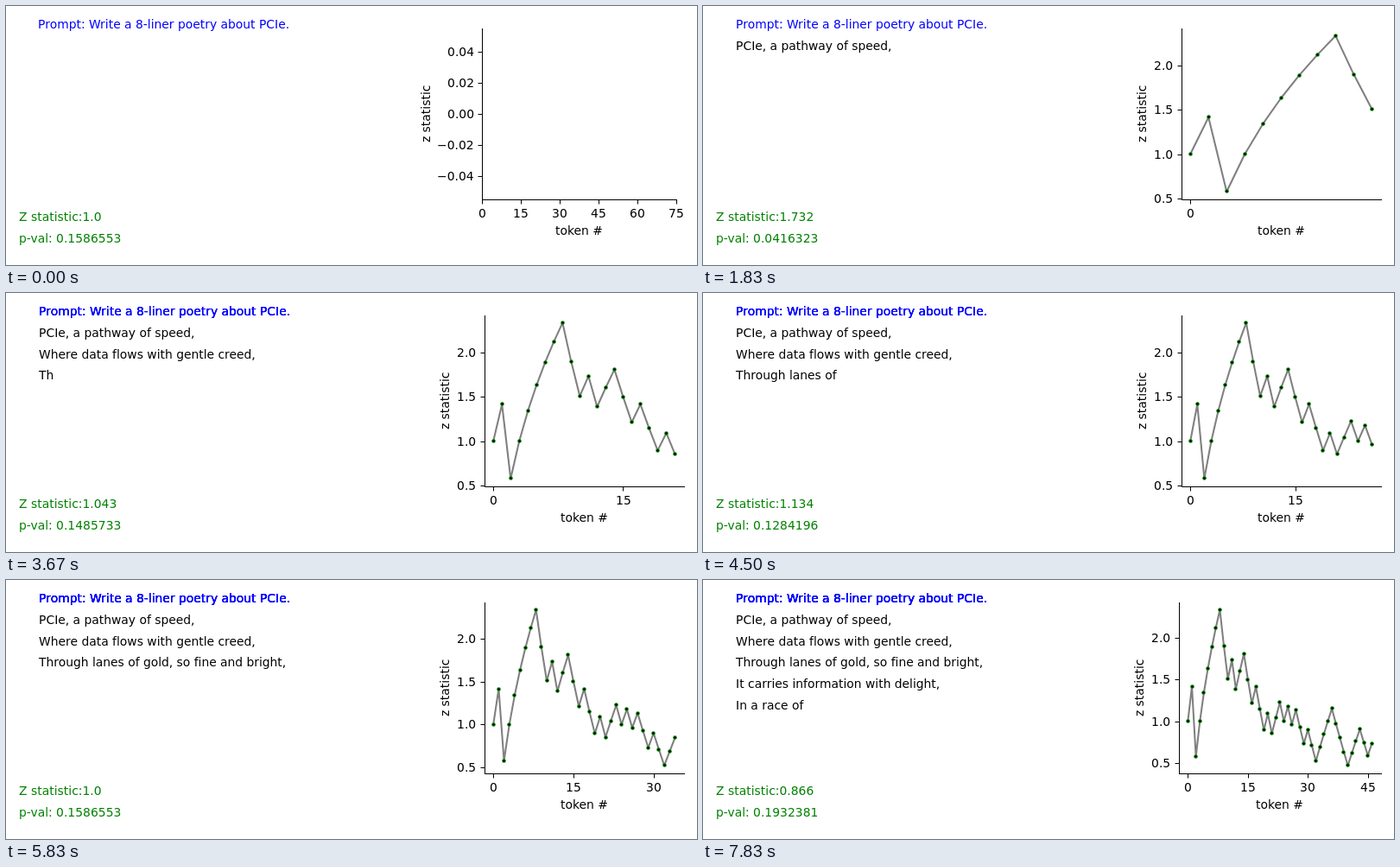
Write an HTML page with a canvas that moves like this. It is 800x300 px and loops after 8 s.

```html
<!DOCTYPE html>
<html lang="en">
<head>
<meta charset="utf-8">
<title>Token z statistic</title>
<style>
  html, body { margin: 0; width: 100%; height: 100%; overflow: hidden; background: #fff; }
  canvas { display: block; }
</style>
</head>
<body>
<canvas id="stage" width="800" height="300"></canvas>
<script>
const ctx = document.getElementById("stage").getContext("2d");

const LOOP = 8000, FPS = 6;
const PT = 100 / 72;
const PAD = 15, TOP = 25.56, BOTTOM = 223.95, HEIGHT = BOTTOM - TOP;
const TICK = 3.5 * PT, TICK_GAP = 2 * TICK, LABEL_GAP = 4 * PT;
// Size of the right-hand axes before the layout is tightened
const LOOSE_WIDTH = 188, LOOSE_BINS = 8, BINS = 7;

ctx.font = `${10 * PT}px "DejaVu Sans", sans-serif`;
ctx.textAlign = "left";

const PROMPT = "Prompt: Write a 8-liner poetry about PCIe.";
const TOKENS = ("|||PC|Ie|,| a| path|way| of| speed|,|\n" +
  "|Where| data| flows| with| gentle| cre|ed|,|\n" +
  "|Th|rough| l|an|es| of| gold|,| so| fine| and| bright|,|\n" +
  "|It| car|ries| information| with| delight|,|\n" +
  "|In| a| race| of").split("|");

// 1 = the token counts towards the statistic
const HITS = "1101111110" + "0101100100" + "1011010100" + "1001111000" + "01110011";
let hits = 0;
const Z = [...HITS].map((hit, i) => {
  const n = i + 1;
  hits += +hit;
  return (hits - n / 2) / Math.sqrt(n / 4);
});

// Upper tail of the normal distribution, by power series
function upperTail(z) {
  let term = z, sum = z;
  for (let n = 3; n < 120; n += 2) sum += term *= z * z / n;
  return 0.5 - sum * Math.exp(-z * z / 2) / Math.sqrt(2 * Math.PI);
}

function decimal(value, digits) {
  const text = String(+value.toFixed(digits));
  return text.includes(".") ? text : text + ".0";
}

function limits(values) {
  if (!values.length) return [-0.055, 0.055];
  let lo = Math.min(...values), hi = Math.max(...values);
  if (lo === hi) {
    const spread = 0.05 * (Math.abs(lo) || 1);
    lo -= spread;
    hi += spread;
  }
  const margin = (hi - lo) * 0.05;
  return [lo - margin, hi + margin];
}

function niceStep([lo, hi], bins) {
  const raw = (hi - lo) / bins;
  const power = 10 ** Math.floor(Math.log10(raw));
  return [1, 2, 2.5, 5, 10].find(s => s * power >= raw) * power;
}

function ticks([lo, hi], step) {
  const list = [];
  for (let i = Math.ceil(lo / step - 1e-9); i * step <= hi + 1e-9; i++) list.push(i * step);
  return list;
}

function yLabels(range, bins) {
  const step = niceStep(range, bins);
  const digits = Math.abs(step * 10 - Math.round(step * 10)) < 1e-6 ? 1 : 2;
  return ticks(range, step).map(value => ({
    value,
    text: (value < -1e-9 ? "\u2212" : "") + Math.abs(value).toFixed(digits)
  }));
}

const textWidth = text => ctx.measureText(text).width;
const eighth = v => Math.round(v * 8) / 8;

// Pen positions with advances and kerning on a grid of eighths of a pixel
const penCache = new Map();
function penStops(text) {
  if (!penCache.has(text)) {
    const stops = [0];
    [...text].forEach((char, i) => {
      const next = text[i + 1] || "";
      const kern = next && textWidth(char + next) - textWidth(char) - textWidth(next);
      stops.push(stops[i] + eighth(textWidth(char)) + eighth(+kern));
    });
    penCache.set(text, stops);
  }
  return penCache.get(text);
}

// anchor: 0 = left, 0.5 = centre, 1 = right
function write(text, x, y, color = "#000", anchor = 0) {
  const stops = penStops(text);
  const origin = Math.round(x - stops[text.length] * anchor);
  ctx.fillStyle = color;
  [...text].forEach((char, i) => ctx.fillText(char, origin + stops[i], y));
}

function widest(labels) {
  return Math.max(...labels.map(({ text }) => {
    const m = ctx.measureText(text);
    return m.width + m.actualBoundingBoxLeft;
  }));
}

function layout(xRange, yRange, xTicks) {
  const last = xTicks[xTicks.length - 1];
  const room = (xRange[1] - last) / (xRange[1] - xRange[0]) * LOOSE_WIDTH;
  const overhang = Math.max(0, textWidth(String(last)) / 2 - room);
  const gap = PAD + TICK_GAP + LABEL_GAP + 14.9 + widest(yLabels(yRange, LOOSE_BINS));
  const right = 800 - PAD - overhang;
  const width = (right - PAD - gap) / 3;
  return { left: right - width, right, width };
}

function dot(x, y, r, color) {
  ctx.fillStyle = color;
  ctx.beginPath();
  ctx.arc(x, y, r, 0, 2 * Math.PI);
  ctx.fill();
}

function drawText(count, width) {
  const row = k => Math.ceil(TOP + k * HEIGHT / 8);
  const x = PAD + 0.1 * width;
  const lines = TOKENS.slice(0, count + 1).join("").split("\n");
  // The prompt is printed again for every line, which thickens it
  lines.forEach((line, i) => {
    write(PROMPT, x, row(0), "#00f");
    write(line, x, row(i + 1));
  });
  write("Z statistic:" + decimal(Z[count], 3), PAD, row(9), "#008000");
  write("p-val: " + decimal(upperTail(Z[count]), 7), PAD, row(10), "#008000");
}

function drawChart(points, xRange, yRange, xTicks, { left, right, width }) {
  const px = v => left + (v - xRange[0]) / (xRange[1] - xRange[0]) * width;
  const py = v => BOTTOM - (v - yRange[0]) / (yRange[1] - yRange[0]) * HEIGHT;
  const x0 = Math.round(left), y0 = Math.round(BOTTOM), y1 = Math.round(TOP);

  ctx.strokeStyle = "#808080";
  ctx.lineWidth = 1.5 * PT;
  ctx.lineJoin = "round";
  ctx.beginPath();
  points.forEach((z, i) => ctx.lineTo(px(i), py(z)));
  ctx.stroke();
  points.forEach((z, i) => {
    const x = Math.round(px(i) - 0.5) + 0.5, y = Math.round(py(z) - 0.5) + 0.5;
    dot(x, y, 2.3, "#008000");
    dot(x, y, 1.2, "#000");
  });

  ctx.fillStyle = "#000";
  ctx.fillRect(x0, y1, 1, y0 - y1 + 1);
  ctx.fillRect(x0, y0, Math.round(right) - x0 + 1, 1);
  for (const v of xTicks) {
    ctx.fillRect(Math.round(px(v)), y0, 1, 5.5);
    write(String(v), px(v), 245, "#000", 0.5);
  }
  const labels = yLabels(yRange, BINS);
  for (const { value, text } of labels) {
    const y = py(value);
    ctx.fillRect(x0 - 4.5, Math.round(y), 5, 1);
    write(text, left - TICK_GAP, Math.round(y + 5), "#000", 1);
  }

  write("token #", left + width / 2, 265, "#000", 0.5);
  ctx.save();
  ctx.translate(Math.round(left - TICK_GAP - LABEL_GAP - widest(labels) - 3.3), Math.round((TOP + BOTTOM) / 2));
  ctx.rotate(-Math.PI / 2);
  write("z statistic", 0, 0, "#000", 0.5);
  ctx.restore();
}

function draw(count) {
  ctx.fillStyle = "#fff";
  ctx.fillRect(0, 0, 800, 300);
  const points = Z.slice(0, count);
  const xRange = count ? limits(points.map((_, i) => i)) : [0, 75];
  const yRange = limits(points);
  const xTicks = ticks(xRange, 15);
  const box = layout(xRange, yRange, xTicks);
  drawText(count, box.width);
  drawChart(points, xRange, yRange, xTicks, box);
}

const start = performance.now();
function tick() {
  const t = Math.max(0, performance.now() - start) % LOOP;
  draw(Math.floor((t + 4) * FPS / 1000) % Z.length);
  requestAnimationFrame(tick);
}
tick();
</script>
</body>
</html>
```
